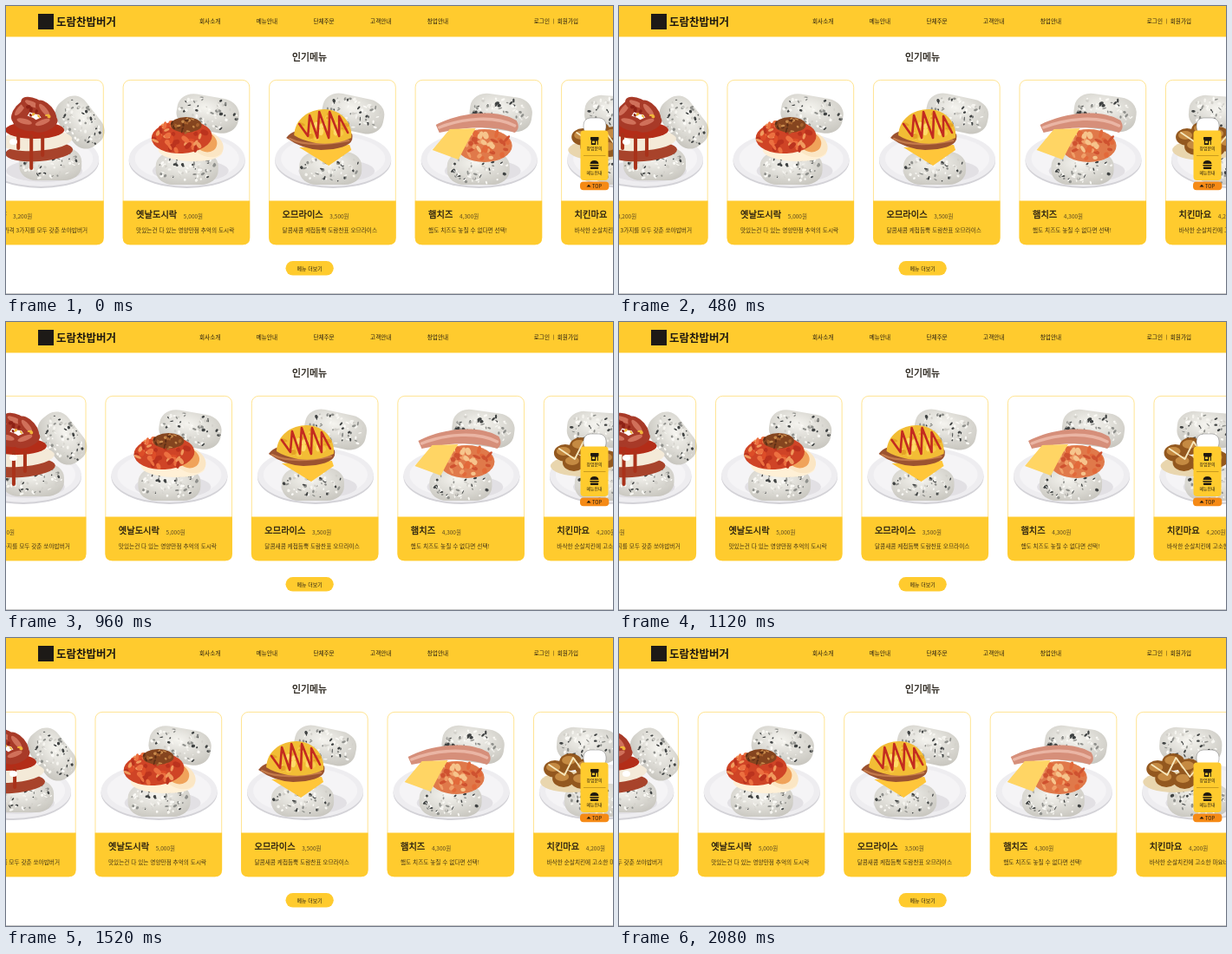
Animation, 700 px wide and 332 px high, one loop 2.16 s. Source, as an HTML page:

```html
<!DOCTYPE html>
<html lang="ko">
<head>
<meta charset="utf-8">
<style>
html, body { margin: 0; width: 100%; height: 100%; overflow: hidden; background: #fff; }
svg { display: block; width: 700px; height: 332px; }
text { font-family: "Noto Sans CJK KR", "Noto Sans CJK", "Noto Sans KR", "Noto Sans", sans-serif; white-space: pre; }
</style>
</head>
<body>
<svg id="stage" viewBox="0 0 700 332" xmlns="http://www.w3.org/2000/svg"></svg>
<script>
const YELLOW = '#ffcb2e', INK = '#1f1910';
const LOOP = 2160, STEP = 80, SHIFT = 1.69, PITCH = 168.5;

// a thin outline gives a medium weight
const MEDIUM = `stroke="${INK}" stroke-width=".28"`;
const CENTER = 'text-anchor="middle"';

let seed = 7;
const rnd = (a, b) => {
  seed = (seed * 16807) % 2147483647;
  return a + (b - a) * seed / 2147483647;
};

// cy is the vertical middle of the text
const label = (x, cy, size, str, more = '') =>
  `<text x="${x}" y="${cy + size * .37}" font-size="${size}" fill="${INK}" ${more}>${str}</text>`;
const oval = (x, y, rx, ry, fill, turn = 0) =>
  `<ellipse cx="${x}" cy="${y}" rx="${rx}" ry="${ry}" fill="${fill}" transform="rotate(${turn} ${x} ${y})"/>`;
const shape = (d, fill) => `<path d="${d}" fill="${fill}"/>`;
const line = (d, color, width) =>
  `<path d="${d}" fill="none" stroke="${color}" stroke-width="${width}" stroke-linecap="round" stroke-linejoin="round"/>`;
const box = (x, y, w, h, r, fill, more = '') =>
  `<rect x="${x}" y="${y}" width="${w}" height="${h}" rx="${r}" fill="${fill}" ${more}/>`;

// small blobs scattered inside an ellipse
function scatter(n, x, y, rx, ry, colors, min, max) {
  let out = '';
  for (let i = 0; i < n; i++) {
    const a = rnd(0, 6.283), r = Math.sqrt(rnd(0, 1));
    out += oval(x + rx * r * Math.cos(a), y + ry * r * Math.sin(a),
      rnd(min, max), rnd(min, max) * .7, colors[i % colors.length], rnd(0, 180));
  }
  return out;
}

const rice = (x, y, rx, ry, turn = 0) => `<g transform="rotate(${turn} ${x} ${y})">` +
  box(x - rx, y - ry, rx * 2, ry * 2, rx * .55, 'url(#rice)', `ry="${ry * .85}"`) +
  scatter(75, x, y, rx * .95, ry * .92, ['#fbfaf6', '#d2d0ca', '#3f4242', '#f6f5f0', '#8f908c'], .7, 2.6) + '</g>';

const plate = oval(74, 178.5, 67, 31.5, '#d3d2d7') + oval(74, 176.5, 67, 31.5, '#eeedf0') +
  oval(74, 176, 60, 26.5, '#f5f4f6') + oval(78, 190, 44, 13, '#e2e0e4');

const fillings = [
  // sausage
  () => rice(85, 182, 36, 19) + rice(119, 134, 32, 20, 52) +
    oval(72, 168, 39, 11, '#a8432b', -4) + oval(68, 155, 42, 12, '#f4ead8', -3) +
    oval(67, 143, 34, 10, '#b32d18') +
    [[52, 121, -50], [66, 115, 25], [80, 122, 50], [57, 135, 15], [78, 136, -20]]
      .map(([x, y, a]) => oval(x, y, 16, 8.5, '#a83a28', a) + oval(x - 2, y - 2, 9, 3, '#d0705a', a)).join('') +
    scatter(8, 67, 124, 20, 12, ['#f0b53a', '#8d2115'], 1.5, 3) +
    line('M63 150V187M76 150V172M48 148V164', '#a9321a', 4),
  // kimchi and egg
  () => rice(74, 187, 36, 19) + rice(98, 124, 36, 20, 10) +
    oval(78, 167, 37, 12, '#fff0d6', 2) + oval(97, 159, 20, 14, '#fbe6c4', 25) +
    oval(96, 157, 13, 11, '#f0a35a', 25) +
    oval(68, 151, 35, 19, '#cf4426', -3) +
    scatter(46, 66, 150, 31, 18, ['#ec7040', '#bb331e', '#dd4d28', '#f09a5e'], 2, 5) +
    oval(73, 137, 18, 9, '#85451f') +
    scatter(24, 73, 137, 17, 9, ['#5f2f16', '#a8632f', '#c78a4c'], 1, 2.6),
  // omelette
  () => rice(71, 187, 36, 19) + rice(97, 124, 36, 20, 12) +
    shape('M35 163L93 160L95 166L69 184Z', '#ffc63a') +
    shape('M20 152Q24 146 32 144H90Q98 146 96 154Q92 165 60 166Q38 165 20 152Z', '#9c5330') +
    line('M24 153Q46 164 92 155', '#c47a4a', 2.4) +
    shape('M29 149C30 130 46 119 64 119C84 119 97 136 95 152Q76 161 54 158Q38 155 29 149Z', '#f2bd35') +
    scatter(22, 62, 139, 27, 15, ['#ffdb68', '#e5a325', '#f8cb48'], 2, 5) +
    line('M35 136L45 150L47 126L56 152L58 122L69 152L70 122L81 150L81 127L91 146', '#c32b20', 2.6),
  // ham and cheese
  () => rice(73, 187, 36, 19) + rice(99, 123, 36, 20, 8) +
    oval(80, 161, 32, 19, '#e0794a') +
    scatter(40, 82, 160, 28, 16, ['#f09f68', '#cf5230', '#f6c48c', '#e2693a'], 2, 5) +
    shape('M24 137C48 124 92 117 117 132Q122 141 115 146C90 138 60 139 28 146Z', '#d68f7a') +
    line('M28 140C56 129 92 126 115 138', '#eab5a4', 3.4) +
    shape('M20 166L40 142L70 141L62 154L50 177Z', '#ffd564'),
  // fried chicken
  () => rice(72, 187, 36, 19) + rice(63, 124, 36, 20, 4) +
    oval(44, 166, 36, 12, '#e9d6ae') +
    [[25, 151], [43, 143], [61, 149], [35, 162], [56, 164], [73, 158]]
      .map(([x, y]) => oval(x, y, 13, 10, '#93581f') + oval(x - 2, y - 2, 8, 5, '#c58a42')).join('') +
    line('M18 146L36 158L46 138L62 160L74 146', '#f7e8bd', 1.8)
];

const menu = [
  ['쏘야', '3,200원', '맛,양,가격 3가지를 모두 갖춘 쏘야밥버거'],
  ['옛날도시락', '5,000원', '맛있는건 다 있는 영양만점 추억의 도시락'],
  ['오므라이스', '3,500원', '달콤새콤 케첩듬뿍 도람찬표 오므라이스'],
  ['햄치즈', '4,300원', '햄도 치즈도 놓칠 수 없다면 선택!'],
  ['치킨마요', '4,200원', '바삭한 순살치킨에 고소한 마요네즈']
];

const card = ([name, price, note], i) => `<g transform="translate(${-33.8 + PITCH * i} 0)">` +
  box(.4, 85.4, 145.7, 189.4, 8, '#fff') + plate + fillings[i]() +
  box(.4, 85.4, 145.7, 189.4, 8, 'none', `stroke="${YELLOW}" stroke-width=".8" stroke-opacity=".65"`) +
  shape('M0 224.5H146.5V267.2Q146.5 275.2 138.5 275.2H8Q0 275.2 0 267.2Z', YELLOW) +
  label(15.4, 240, 10.25,
    `${name}<tspan dx="7.6" dy="1.1" font-size="6.5" fill="#594821" stroke="none">${price}</tspan>`, MEDIUM) +
  label(15.4, 258.5, 6.65, note, 'fill-opacity=".85"') + '</g>';

const header = box(0, 0, 700, 35.5, 0, YELLOW) +
  box(37, 9, 18, 18, 0, '#1d1a17') + label(58, 18, 12.5, '도람찬밥버거', 'font-weight="700"') +
  ['회사소개', '메뉴안내', '단체주문', '고객안내', '창업안내']
    .map((s, i) => label(223 + 65.7 * i, 17.5, 6.6, s)).join('') +
  label(608.8, 17.5, 6.6, '로그인') +
  box(631, 14.6, .6, 6, 0, '#6b5417') +
  label(635.8, 17.5, 6.6, '회원가입');

const shop = box(674, 151, 9.5, 3.5, .6, INK) + box(674.8, 154, 8, 6, 0, INK) +
  box(676, 155.6, 3, 2.6, 0, YELLOW) + box(680.2, 155.6, 1.7, 4.4, 0, YELLOW);
const bun = shape('M673.5 182Q674 178 678.5 178T683.5 182Z', INK) +
  box(673.2, 183, 10.6, 1.6, .8, INK) + box(673.8, 185.5, 9.4, 2.5, 1, INK);

const side =
  box(666, 129, 26, 19, 8, '#fff', 'stroke="#555" stroke-width=".4"') +
  box(662.5, 143.5, 32, 57.5, 4, YELLOW) + shop + bun +
  label(678.6, 164, 4.9, '창업문의', CENTER) +
  box(666, 172, 25.5, .6, 0, '#a57e16') +
  label(678.6, 192.3, 4.9, '메뉴안내', CENTER) +
  box(662, 202.5, 33.3, 9.8, 4, '#f58a16') +
  shape('M669.5 208.5L672 205.8L674.5 208.5Z', INK) +
  label(676, 207.4, 5.7, 'TOP');

const stage = document.getElementById('stage');
stage.innerHTML = `<defs><radialGradient id="rice" cx=".45" cy=".35" r=".7">
  <stop offset="0" stop-color="#f5f4ef"/><stop offset="1" stop-color="#c9c7c0"/></radialGradient></defs>` +
  box(0, 0, 700, 332, 0, '#fff') + header +
  label(350, 59, 10.9, '인기메뉴', `${CENTER} ${MEDIUM}`) +
  `<g id="cards">${menu.map(card).join('')}</g>` +
  oval(8.5, 156.5, 4.5, 3.6, '#fff') +
  box(322.5, 294, 55.3, 16.6, 8.3, YELLOW) +
  label(350.2, 302.3, 6, '메뉴 더보기', CENTER) +
  side + box(0, 331, 700, 1, 0, '#c9c9c9');

const cards = document.getElementById('cards');
function draw() {
  const n = Math.floor(performance.now() % LOOP / STEP);
  cards.setAttribute('transform', `translate(${-SHIFT * n} 0)`);
  requestAnimationFrame(draw);
}
draw();
</script>
</body>
</html>
```
